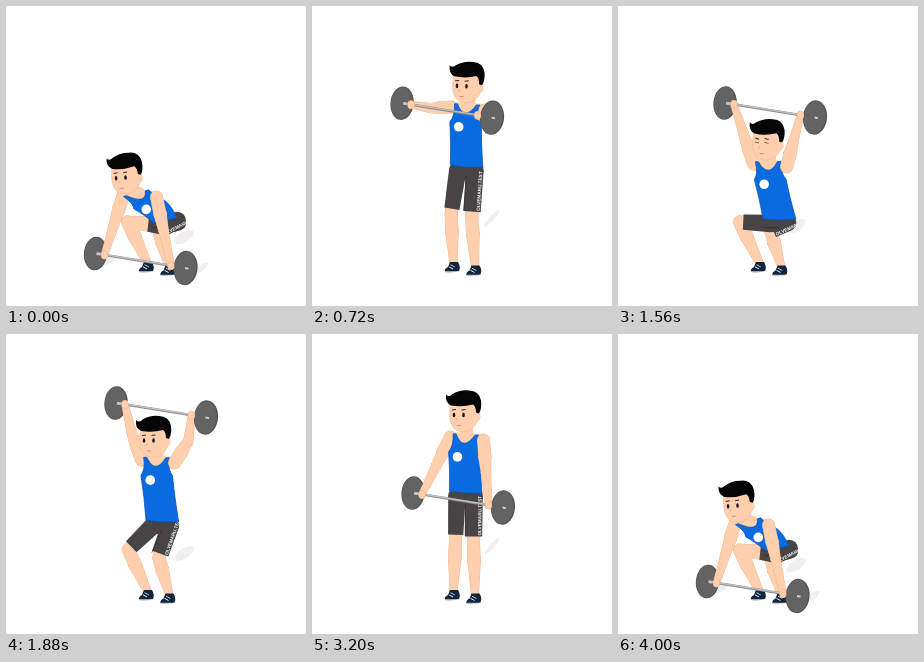
Animation of 300x300 px, one loop 4.44 s. Source, as an HTML page with a canvas:

```html
<!DOCTYPE html>
<html lang="en">
<head>
<meta charset="utf-8">
<title>Barbell snatch</title>
<style>
html, body { margin: 0; width: 100%; height: 100%; overflow: hidden; background: #fff; }
canvas { display: block; width: 100vw; height: 100vh; }
</style>
</head>
<body>
<canvas id="stage"></canvas>
<script>
(() => {
const canvas = document.getElementById('stage');
const ctx = canvas.getContext('2d');
const LOOP = 4440, STEP = 40;
const SKIN = '#ffcfae', SHADE = '#f2b28c', BLUE = '#0a6be0', DARK = '#464444', HAIR = '#050505';

// Pose: left plate x y, head x y tilt, chest x y, hip x y
const floor    = [89.5, 247.5, 120, 171, -.08, 134, 189, 163, 212];
const low      = [85, 219, 123, 132, -.1, 135, 152, 162, 189];
const hinge    = [100, 163, 131, 91.5, -.1, 141, 113, 154, 158];
const extend   = [96, 140, 150, 80, 0, 153, 103, 154, 157];
const pull     = [86.5, 112, 154, 79, .03, 156, 101, 154, 158];
const turn     = [113, 57, 157, 88, .05, 157, 111, 157, 168];
const drop     = [119, 65, 156, 107, .05, 157, 129, 159, 188];
const under    = [115, 84, 153.5, 125, .05, 156, 146, 160, 203];
const squat    = [107, 97, 149, 137, .04, 152, 159, 161, 212];
const rise     = [110, 69, 148, 106, 0, 152, 127, 156, 186];
const overhead = [112, 40, 152, 80, 0, 156, 101, 153.5, 158];
const front    = [74, 98, 152, 80, 0, 155, 102, 153.5, 158];
const rack     = [80, 129, 152, 80, 0, 155, 103, 153.5, 158];
const stand    = [101, 159, 152, 80.5, 0, 155, 104, 153.5, 157];
const bow      = [94, 188, 130, 101, -.1, 140, 122, 157, 166];
const keys = [
  [0, floor], [200, low], [400, hinge], [560, extend], [680, pull], [840, turn],
  [960, drop], [1040, under], [1200, squat], [1560, squat], [1880, rise], [2200, overhead],
  [2440, overhead], [2820, front], [2960, rack], [3200, stand], [3520, bow], [3760, low],
  [4000, floor], [LOOP, floor]
];

const clamp = (v, lo, hi) => Math.max(lo, Math.min(hi, v));
const mix = (a, b, t) => [a[0] + (b[0] - a[0]) * t, a[1] + (b[1] - a[1]) * t];
const add = (p, x, y) => [p[0] + x, p[1] + y];

function slope(i, c) {
  const a = keys[i], b = keys[i + 1];
  return a && b ? (b[1][c] - a[1][c]) / (b[0] - a[0]) : 0;
}
// Zero at turning points and holds, so the curve never overshoots
function tangent(i, c) {
  const a = slope(i - 1, c), b = slope(i, c);
  return a * b > 0 ? 2 * a * b / (a + b) : 0;
}
function poseAt(t) {
  let i = 0;
  while (i < keys.length - 2 && t >= keys[i + 1][0]) i++;
  const [t0, a] = keys[i], [t1, b] = keys[i + 1];
  const d = t1 - t0, u = (t - t0) / d, v = 1 - u;
  return a.map((p, c) =>
    (1 + 2 * u) * v * v * p + u * u * (3 - 2 * u) * b[c] +
    d * u * v * (v * tangent(i, c) - u * tangent(i + 1, c)));
}

function ellipse(p, rx, ry, fill, rot = 0) {
  ctx.beginPath();
  ctx.ellipse(p[0], p[1], rx, ry, rot, 0, 7);
  ctx.fillStyle = fill;
  ctx.fill();
}
function poly(fill, points) {
  ctx.beginPath();
  points.forEach(p => ctx.lineTo(p[0], p[1]));
  ctx.closePath();
  ctx.fillStyle = fill;
  ctx.fill();
}
function line(a, b, width, color) {
  ctx.beginPath();
  ctx.moveTo(...a);
  ctx.lineTo(...b);
  ctx.lineWidth = width;
  ctx.strokeStyle = color;
  ctx.stroke();
}
function path(d, fill) {
  ctx.fillStyle = fill;
  ctx.fill(new Path2D(d));
}
function taper(a, b, ra, rb, fill, round = true) {
  const len = Math.hypot(b[0] - a[0], b[1] - a[1]) || 1;
  const nx = (a[1] - b[1]) / len, ny = (b[0] - a[0]) / len;
  poly(fill, [add(a, nx * ra, ny * ra), add(b, nx * rb, ny * rb),
              add(b, -nx * rb, -ny * rb), add(a, -nx * ra, -ny * ra)]);
  ellipse(a, ra, ra, fill);
  if (round) ellipse(b, rb, rb, fill);
}
// Jointed limb with a thin darker rim
function limb(points, radii) {
  for (const [grow, fill] of [[.4, SHADE], [0, SKIN]])
    for (let i = 0; i < points.length - 1; i++)
      taper(points[i], points[i + 1], radii[i] + grow, radii[i + 1] + grow, fill);
}

function arm(shoulder, hand, side, len) {
  const dx = hand[0] - shoulder[0], dy = hand[1] - shoulder[1];
  const d = Math.hypot(dx, dy) || 1;
  const h = Math.sqrt(Math.max(0, len * len - d * d / 4)) * clamp(dy / 20, -1, 1) * side / d;
  const elbow = add(mix(shoulder, hand, .5), dy * h, -dx * h);
  limb([shoulder, mix(shoulder, elbow, .5), elbow, hand], [6, 6.2, 4.8, 3.2]);
}

function plate(p, rx, ry) {
  ellipse(p, rx, ry, '#525252', .1);
  ellipse(add(p, -.4, 0), rx - 1, ry - .8, '#646363', .1);
}

function shoe(x, y) {
  ctx.save();
  ctx.translate(x, y);
  path('M-4-5 L4-5 Q7 0 5 4 Q0 6-9 5 Q-10 2-6 0 Z', '#10263f');
  line([-9, 4.8], [4, 4.8], .9, '#f3f5f7');
  line([-5, -.2], [-1, 2], 1, '#f3f5f7');
  line([-3.5, -2.3], [.8, 0], .8, '#f3f5f7');
  ctx.restore();
}

function head(x, y, tilt, squint) {
  ctx.save();
  ctx.translate(x, y);
  ctx.rotate(tilt);
  const face = 'M-13-12 C-15-3-15 6-12 11 C-9 16-4 18 1 17 C8 16 13 10 15 3 L15-12 Z';
  path(face, SKIN);
  ctx.lineWidth = .5;
  ctx.strokeStyle = SHADE;
  ctx.stroke(new Path2D(face));
  ellipse([14, 2], 2.6, 4, SKIN);
  path('M-13-9 Q-19-12-18-20 Q-15-17-12-20 Q-4-25 5-24 Q15-24 17-14 Q18-6 15-1 L12-2 Q12-8 9-10 Q-2-7-13-9 Z', HAIR);
  for (const ex of [-10, -.5]) {
    if (squint) line([ex - 2, -.5], [ex + 2, .3], .8, '#6b4a3c');
    else ellipse([ex, .5], 1.3, 2.3, '#17151a');
    line([ex - 2, -4.5], [ex + 2, squint ? -3.5 : -5], 1, '#3a2a25');
  }
  line([-7, 3.5], [-8, 6], .7, '#df9c7d');
  line([-7, 11], [-3, 10.8], .8, '#c97f69');
  ctx.restore();
}

function draw(t) {
  const [bx, by, hx, hy, tilt, cx, cy, px, py] = poseAt(t);
  const L = [bx, by], R = add(L, 90, 14.5), C = [cx, cy], P = [px, py];
  const lean = clamp((px - cx - 13) / 14, 0, 1);
  const bend = clamp((py - 158) / 30, 0, 1);
  const sink = Math.sqrt(bend);

  // Torso frame: u runs down the spine, w across the hips
  const spine = Math.hypot(px - cx, py - cy);
  const u = [(px - cx) / spine, (py - cy) / spine];
  const wl = Math.hypot(u[1] + 2, u[0]);
  const w = [(u[1] + 2) / wl, -u[0] / wl];
  const at = (o, across, down) =>
    add(o, w[0] * across + u[0] * down, w[1] * across + u[1] * down);

  const shoulderL = add(C, -16.5, -1), shoulderR = add(C, 16.5, 2);
  const handL = add(L, 9, 1.5), handR = add(L, 75.5, 12.2);
  const hipL = add(at(P, -8.5, 0), 0, 5), hipR = add(at(P, 8.5, 0), 0, 5);
  const kneeL = mix([143.5, 206], [121.5, 216], sink);
  const kneeR = mix([161.5, 208], [152.5, 224], sink);
  const ankleL = [141.5, 257], ankleR = [163, 260];

  ctx.fillStyle = '#fff';
  ctx.fillRect(0, 0, 300, 300);
  ellipse([180 - bend * 2, 212 + bend * 8 + lean * 11], 11, 2.2 + bend * 3, '#f1eeee', -.85 + bend * .3);
  if (by > 235) {
    ellipse(add(L, 13, 7), 9, 3, '#efefef', -.5);
    ellipse(add(R, 14, 1), 10, 3, '#efefef', -.6);
  }

  plate(L, 11.6, 16.8);

  limb([hipL, kneeL, mix(kneeL, ankleL, .35), ankleL], [8, 6, 6.4, 3.6]);
  limb([hipR, kneeR, mix(kneeR, ankleR, .35), ankleR], [8, 6, 6.4, 3.6]);
  shoe(142, 261);
  shoe(163.5, 264.5);

  const hemL = mix(hipL, kneeL, .88 - lean * .5), hemR = mix(hipR, kneeR, .88);
  ellipse(add(P, 0, 6), 17, 8.5, DARK);
  taper(hipL, hemL, 8.8, 7.6, DARK, false);
  taper(hipR, hemR, 8.8, 8.6, DARK, false);
  line(add(hipR, -8.5, 5), add(hemR, -8.3, -1), .7, '#2c2c2c');

  // Lettering climbs the outer seam from hem to hip
  const run = Math.hypot(hipR[0] - hemR[0], hipR[1] - hemR[1]);
  ctx.save();
  ctx.translate(...hemR);
  ctx.rotate(Math.atan2(hipR[1] - hemR[1], hipR[0] - hemR[0]));
  ctx.beginPath();
  ctx.rect(0, -10, run + 7, 20);
  ctx.clip();
  ctx.fillStyle = '#fff';
  ctx.font = 'bold 4.7px "Liberation Sans", Arial, sans-serif';
  ctx.fillText('OLVEMARU.TEST', 1, 7.6);
  ctx.restore();

  arm(shoulderL, handL, -1, 29);
  taper(add(shoulderL, 2, 1), add(shoulderR, -1, 0), 6, 6, SKIN);
  taper([hx + 3, hy + 10], C, 5.5, 7, SKIN);

  const flank = mix(C, P, .6);
  ctx.beginPath();
  ctx.moveTo(...at(C, -14, -4));
  ctx.lineTo(...at(C, -11, -4));
  ctx.quadraticCurveTo(...at(C, -4, 14), ...at(C, 8, -3));
  ctx.lineTo(...at(C, 11.5, -3));
  ctx.quadraticCurveTo(...at(C, 9, 9), ...at(C, 13.5, 15));
  ctx.quadraticCurveTo(...at(flank, 14, 0), ...at(P, 16.5 - lean * 10, 2));
  ctx.quadraticCurveTo(...at(P, 0, 3), ...at(P, -16, 0));
  ctx.quadraticCurveTo(...at(flank, -16, 0), ...at(C, -18, 14));
  ctx.quadraticCurveTo(...at(C, -13, 8), ...at(C, -14, -4));
  ctx.fillStyle = BLUE;
  ctx.fill();
  ctx.lineWidth = .8;
  ctx.strokeStyle = '#0a54b8';
  ctx.stroke();
  ellipse(at(C, -9, 19), 4.8, 4.8, '#fff');

  arm(shoulderR, handR, 1, 26);
  head(hx, hy, tilt, t >= 760 && t < 1600);

  line(add(L, 2, .3), R, 2.6, '#8d8d90');
  line(add(L, 2, -.1), add(R, 0, -.4), 1.2, '#c3c3c6');
  plate(R, 12, 17.2);
  line(add(R, -.5, 0), add(R, 3, .6), 1.8, '#d0d0d0');
  line(add(L, 1, .1), add(L, 5, .8), 2.6, '#c6c6c8');
  for (const hand of [handL, handR]) {
    ellipse(hand, 3.5, 4.4, SHADE);
    ellipse(hand, 3, 3.9, SKIN);
  }
}

function resize() {
  const ratio = window.devicePixelRatio || 1;
  canvas.width = Math.round(innerWidth * ratio);
  canvas.height = Math.round(innerHeight * ratio);
  ctx.setTransform(canvas.width / 300, 0, 0, canvas.height / 300, 0, 0);
}

const start = performance.now();
function frame() {
  const t = Math.max(0, performance.now() - start) % LOOP;
  draw(Math.floor(t / STEP) * STEP);
  requestAnimationFrame(frame);
}
addEventListener('resize', resize);
resize();
frame();
})();
</script>
</body>
</html>
```
